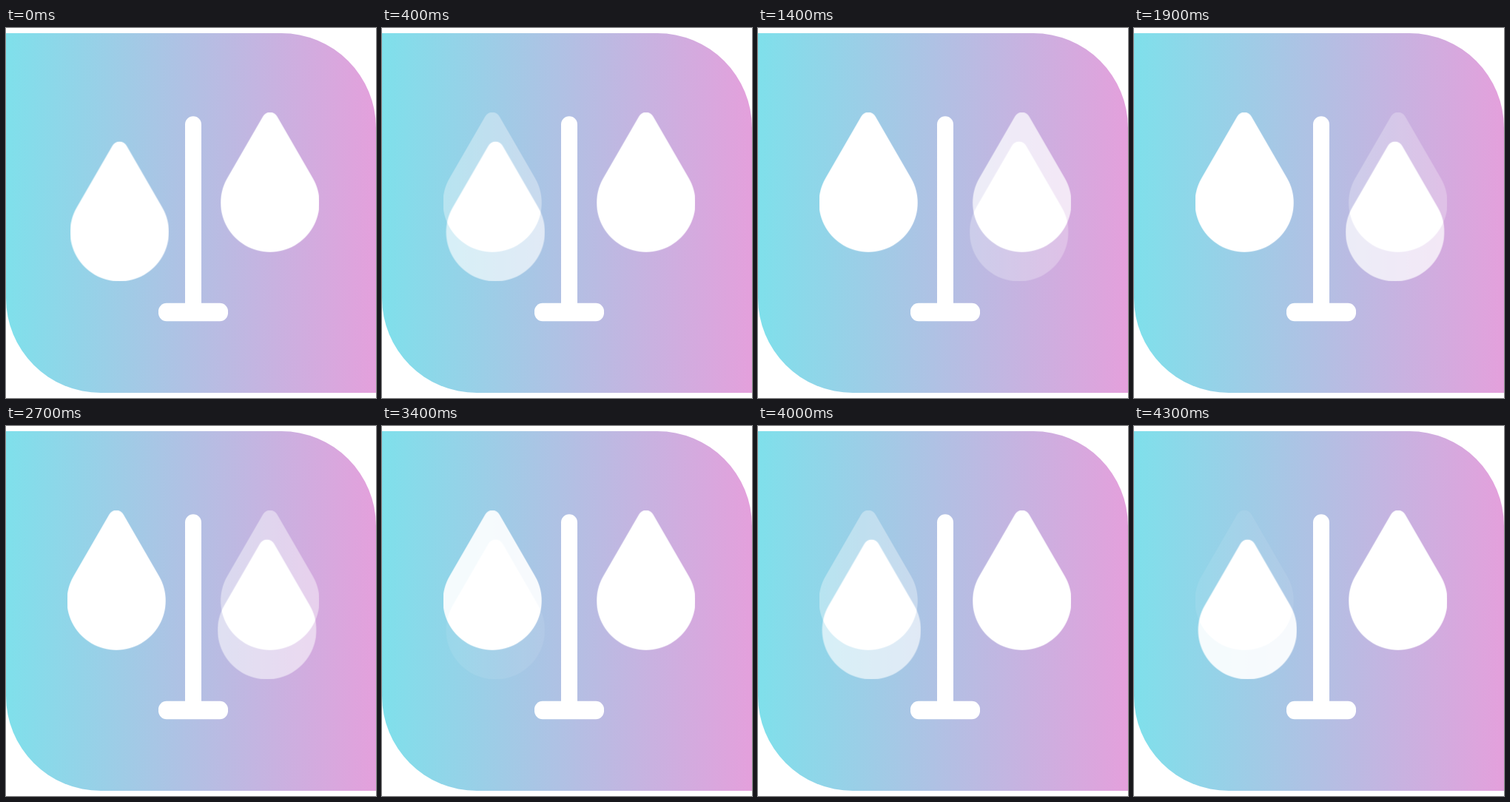
An HTML page that plays this animation: 500 by 500 pixels, repeating every 4.4 s.

```html
<!DOCTYPE html>
<html lang="en">
<head>
<meta charset="utf-8">
<title>Balance of drops</title>
<style>
  html, body { margin: 0; width: 100%; height: 100%; overflow: hidden; background: #fff; }
  svg { display: block; width: 100%; height: 100%; }
  /* Additive blending keeps the overlap of a cross-fading pair solid white. */
  .pair { isolation: isolate; }
  .pair use { mix-blend-mode: plus-lighter; }
</style>
</head>
<body>
<svg viewBox="0 0 500 500">
  <defs>
    <linearGradient id="sky">
      <stop offset="0" stop-color="#7fe0eb"/>
      <stop offset="1" stop-color="#e4a0dc"/>
    </linearGradient>
    <path id="drop" d="M-57.8-33.35L-9.7-116.6A11.2 11.2 0 0 1 9.7-116.6L57.8-33.35A66.7 66.7 0 1 1-57.8-33.35Z"/>
  </defs>
  <path fill="url(#sky)" d="M0 7H372A128 128 0 0 1 500 135V493H128A128 128 0 0 1 0 365Z"/>
  <g fill="#fff">
    <path d="M242 380V130.2A11 11 0 0 1 264 130.2V380Z"/>
    <rect x="206" y="371.7" width="94" height="24.6" rx="11"/>
    <g class="pair">
      <use id="leftLow" href="#drop" x="153.4" y="275.8"/>
      <use id="leftHigh" href="#drop" x="149.1" y="236.2"/>
    </g>
    <g class="pair">
      <use id="rightLow" href="#drop" x="352.7" y="275.8"/>
      <use id="rightHigh" href="#drop" x="356.8" y="236.2"/>
    </g>
  </g>
</svg>
<script>
  // Opacity at each quarter of the loop; every quarter fades in 11 steps.
  const fades = {
    leftLow:   [1, 0, 0, 0, 1],
    leftHigh:  [0, 1, 1, 1, 0],
    rightLow:  [0, 0, 1, 0, 0],
    rightHigh: [1, 1, 0, 1, 1]
  };

  for (const [id, levels] of Object.entries(fades)) {
    document.getElementById(id).animate(
      levels.map(opacity => ({ opacity, easing: 'steps(11, end)' })),
      { duration: 4400, delay: -5, iterations: Infinity }
    );
  }
</script>
</body>
</html>
```
